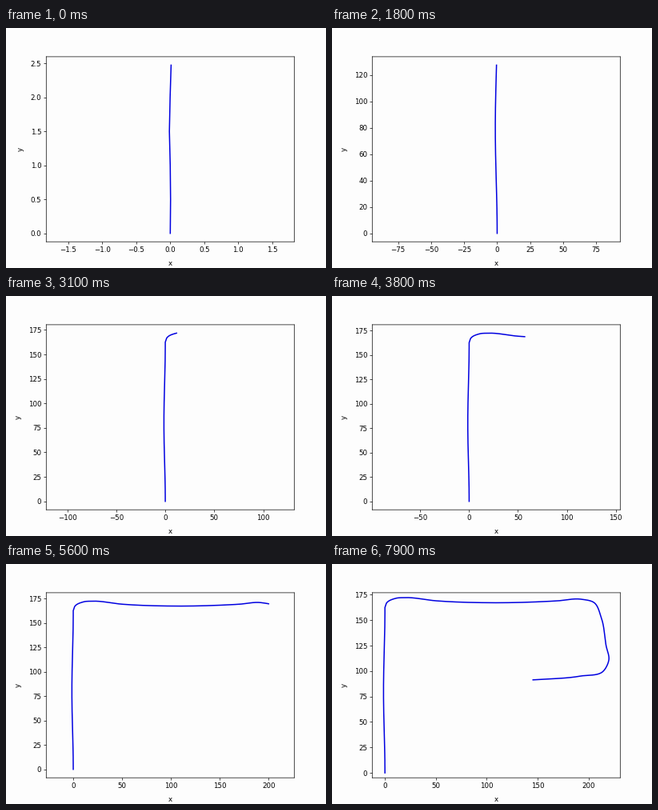
These frames come from a looping animation (400x300 px, 8000 ms). A matplotlib script:

```python
import numpy as np
import matplotlib.pyplot as plt
from matplotlib.animation import FuncAnimation

FRAMES, INTERVAL = 80, 100
PAPER, BLUE = "#fdfdfd", "#0000e0"

# Corners and bends of the drive after the first straight
BENDS = [(0, 162.5), (1.4, 166.6), (10.5, 171.5), (19.5, 172.2), (50, 169.1),
         (101, 167.2), (169, 169), (193, 170.6), (205.5, 167.3),
         (212.7, 152), (217.3, 125), (220, 111), (214.8, 100.2),
         (192, 95.1), (145.4, 91.4)]

# Frame and distance driven: slow at the start and in the corners
PACE = [(0, 2.475), (5, 25), (11, 68.8), (18, 127.5), (24, 156.8),
        (31, 178.5), (38, 224.1), (46, 293.8), (56, 367.5), (63, 420.2),
        (69, 443.5), (72, 456.6), (79, 515.1)]


def hermite(t, knots, values):
    """Smooth curve through values at unevenly spaced knots."""
    slope = np.gradient(values, knots)
    i = np.clip(np.searchsorted(knots, t, side="right") - 1, 0, len(knots) - 2)
    h = knots[i + 1] - knots[i]
    u = (t - knots[i]) / h
    return ((1 + 2 * u) * (1 - u) ** 2 * values[i]
            + u * (1 - u) ** 2 * h * slope[i]
            + u ** 2 * (3 - 2 * u) * values[i + 1]
            + u ** 2 * (u - 1) * h * slope[i + 1])


def arc_length(points):
    steps = np.hypot(*np.diff(points, axis=0).T)
    return np.concatenate([[0], np.cumsum(steps)])


def straight():
    """Almost vertical leg: a slow sway plus a brief wobble at the start."""
    y = np.arange(0, 162.5, 0.5)
    sway = -1.4 * np.sin(np.pi * y / 160) ** 2
    wobble = 0.01 * y * np.exp(-y / 6) * np.sin(np.pi * y)
    return np.column_stack([sway + wobble, y])


def bends():
    points = np.array(BENDS)
    knots = arc_length(points)
    t = np.linspace(0, knots[-1], 1000)
    return np.column_stack([hermite(t, knots, c) for c in points.T])


path = np.vstack([straight(), bends()])
length = arc_length(path)
driven = hermite(np.arange(FRAMES), *np.array(PACE, float).T)

# Soft lines that may fall between pixels
plt.rcParams["path.snap"] = False
fig, ax = plt.subplots(figsize=(6.4, 4.8), dpi=62.5, facecolor=PAPER)
fig.subplots_adjust(left=50.3 / 400, right=360.3 / 400,
                    bottom=1 - 267.2 / 300, top=1 - 35.9 / 300)


def draw(frame):
    s = driven[frame]
    tip = [np.interp(s, length, c) for c in path.T]
    trail = np.vstack([path[length < s], tip])
    ax.cla()
    ax.set_facecolor(PAPER)
    ax.plot(*trail.T, color=BLUE, lw=1.75)
    ax.set_xlabel("x", labelpad=9)
    ax.set_ylabel("y", labelpad=9.5)
    ax.axis("equal")


anim = FuncAnimation(fig, draw, frames=FRAMES, interval=INTERVAL,
                     init_func=lambda: draw(0), repeat=True, repeat_delay=0)
plt.show()
```
